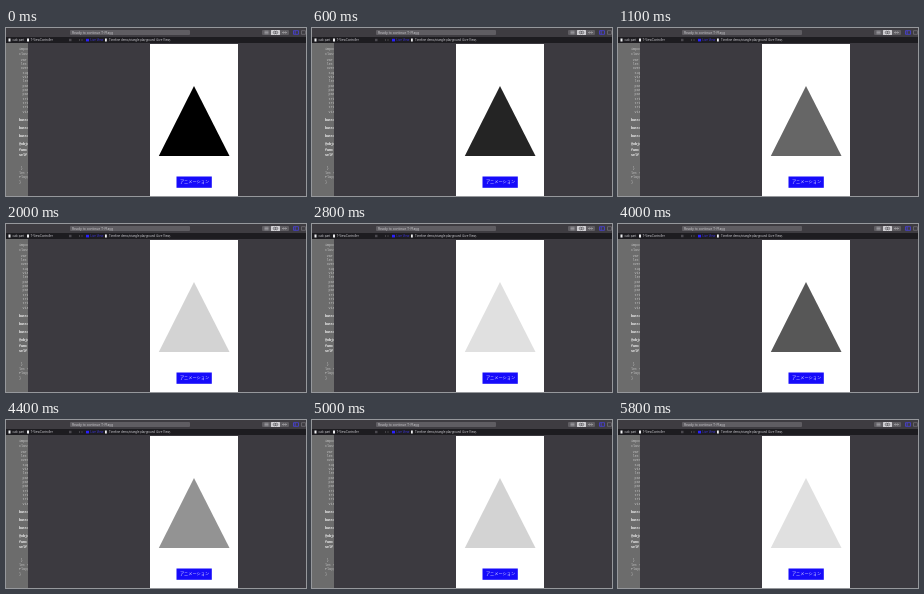
Animation, 300 px wide and 168 px high, one loop 6 s. Source, as an HTML page:

```html
<!DOCTYPE html>
<html lang="en">
<head>
<meta charset="utf-8">
<style>
html, body { margin: 0; width: 100%; height: 100%; overflow: hidden; background: #3c3a40; }
svg { display: block; width: 100vw; height: 100vh; }
text { font-family: Inter, "Liberation Sans", sans-serif; font-size: 3.3px; fill: #c8c7cb; }
.path text { font-size: 2.8px; fill: #d4d3d8; }
.path .live { fill: #3f37e8; }
.code text { font-family: "Liberation Mono", monospace; font-size: 3.4px; fill: #c6c6c6; }
.code .strong { fill: #fff; font-weight: bold; }
text.button { font-family: "Noto Sans CJK JP", "Noto Sans CJK", sans-serif; font-size: 4.2px; fill: #dedcff; }
</style>
</head>
<body>
<svg viewBox="0 0 300 168" preserveAspectRatio="none">
  <defs>
    <clipPath id="pane"><rect y="15" width="22" height="153"/></clipPath>
  </defs>
  <rect width="300" height="168" fill="#3c3a40"/>

  <!-- editor -->
  <rect y="15" width="22" height="153" fill="#6c6c6c"/>
  <g class="code" id="code" clip-path="url(#pane)"></g>

  <!-- toolbar -->
  <rect width="300" height="9" fill="#3e3c41"/>
  <rect x="64" y="2" width="120" height="5" rx="1" fill="#5f5d62"/>
  <text x="66" y="5.6">Ready to continue T-Playg</text>
  <rect x="256" y="2" width="27" height="5" rx="1" fill="#5f5d62"/>
  <rect x="265" y="2" width="9" height="5" rx=".5" fill="#cfced2"/>
  <path d="M258.5 3.2h4M258.5 4.5h4M258.5 5.8h4" stroke="#b8b8bc" stroke-width=".6"/>
  <g fill="none" stroke-width=".7">
    <circle cx="268.6" cy="4.5" r="1.3" stroke="#55535a"/>
    <circle cx="270.4" cy="4.5" r="1.3" stroke="#55535a"/>
    <path d="M276.5 4.5h4M277.5 3.5l-1 1 1 1M279.5 3.5l1 1-1 1" stroke="#a9a8ad"/>
    <path d="M287.5 2.7h5v3.6h-5zM289.2 2.7v3.6" stroke="#4b43f0"/>
    <path d="M295.5 2.7h4v3.6h-4z" stroke="#77757c"/>
  </g>

  <!-- path bar -->
  <rect y="9" width="300" height="6" fill="#1d1c20"/>
  <g class="path">
    <rect x="2.5" y="10.5" width="2" height="3" fill="#f0f0f2"/>
    <text x="6.5" y="13">calc part</text>
    <rect x="21" y="10.5" width="2" height="3" fill="#f0f0f2"/>
    <text x="24.5" y="13">T-ViewController</text>
    <rect x="63" y="10.8" width="2.5" height="2.4" fill="#4b494f"/>
    <path d="M74 11l-1 1 1 1M75.5 11l1 1-1 1" fill="none" stroke="#6a686e" stroke-width=".5"/>
    <rect x="80" y="10.8" width="3" height="2.6" fill="#2a20ff"/>
    <text class="live" x="84.5" y="13">Live View</text>
    <rect x="99" y="10.5" width="1.8" height="3" fill="#f0f0f2"/>
    <text x="103" y="13">Timeline demo/triangle.playground (Live View)</text>
  </g>

  <!-- live view -->
  <rect x="144" y="16" width="88" height="152" fill="#fff"/>
  <path id="triangle" d="M188 58L223.5 128H152.8z"/>
  <rect x="170.5" y="148.5" width="35.3" height="11.3" fill="#160bfa"/>
  <text class="button" x="188.5" y="155.3" text-anchor="middle">アニメーション</text>
</svg>
<script>
const LOOP = 6000, STEP = 100, RESTART = 3100, CYCLE = 3000;
const FADE = 2530, LEAD = 100, LIGHT = 224;
const triangle = document.getElementById('triangle');

// y, indent, words, bold
const lines = [
  [21, 0, 'impor'], [26, 0, 'class'], [32, 1, 'var t'], [36, 1, 'let b'], [40, 1, 'overr'],
  [45, 2, 'super'], [49, 2, 'view'], [53, 2, 'let p'], [58, 2, 'path'], [62, 2, 'path'],
  [66, 2, 'path'], [71, 2, 'tri'], [75, 2, 'tri'], [79, 2, 'tri'], [84, 2, 'view'],
  [92, 0, 'butto', 1], [100, 0, 'butto', 1], [108, 0, 'butto', 1], [116, 0, '@objc', 1],
  [122, 0, 'func', 1], [127, 0, 'self', 1], [140, 1, '}'], [145, 0, 'let v'],
  [149, 0, 'Playg'], [154, 0, '}']
];
const code = document.getElementById('code');
for (const [y, indent, words, strong] of lines) {
  const line = document.createElementNS('http://www.w3.org/2000/svg', 'text');
  line.setAttribute('x', 13 + indent * 1.8);
  line.setAttribute('y', y + 1.2);
  if (strong) line.setAttribute('class', 'strong');
  line.textContent = words;
  code.append(line);
}

// cubic-bezier(.42, 0, .58, 1), solved by bisection
function easeInOut(x) {
  if (x <= 0 || x >= 1) return x <= 0 ? 0 : 1;
  let lo = 0, hi = 1, u = 0.5;
  for (let i = 0; i < 24; i++) {
    u = (lo + hi) / 2;
    const at = 3 * u * (1 - u) * (0.42 * (1 - u) + 0.58 * u) + u ** 3;
    if (at < x) lo = u; else hi = u;
  }
  return u * u * (3 - 2 * u);
}

function draw(now) {
  const t = Math.floor((now % LOOP) / STEP) * STEP;
  const phase = t < RESTART ? t : t - CYCLE;
  const k = phase === 0 ? 0 : easeInOut((phase + LEAD) / FADE);
  const v = Math.round(LIGHT * k);
  triangle.setAttribute('fill', `rgb(${v},${v},${v})`);
}

const start = performance.now();
function tick() {
  draw(performance.now() - start);
  requestAnimationFrame(tick);
}
tick();
</script>
</body>
</html>
```
